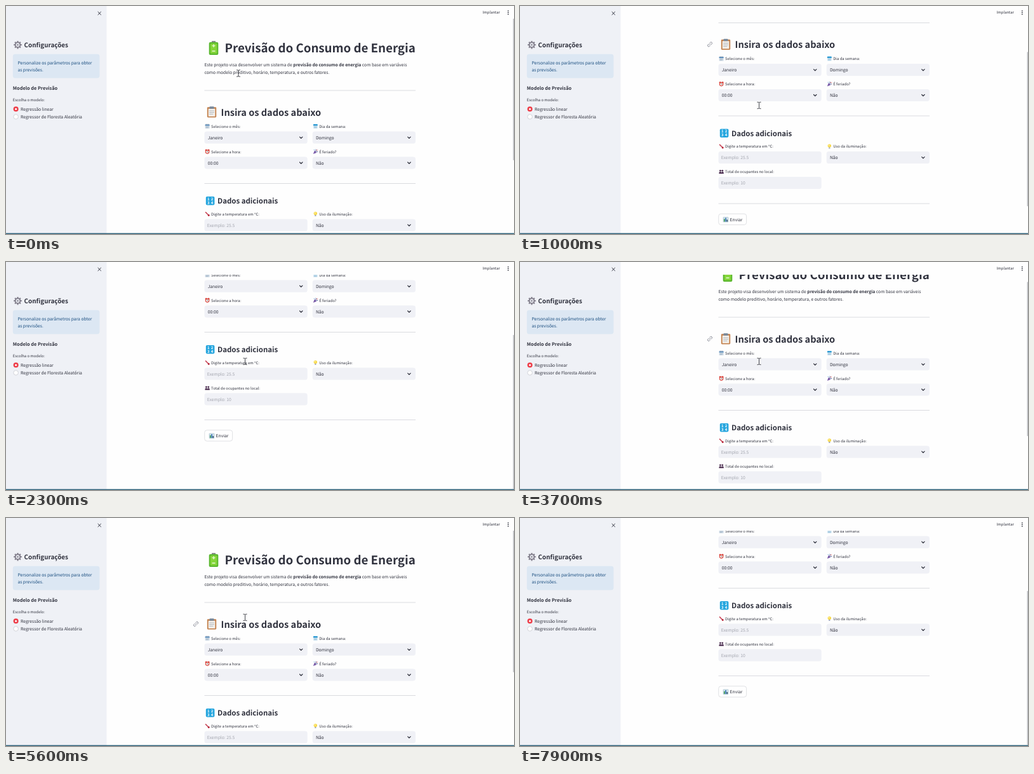
These frames come from a looping animation (800x359 px, 8000 ms). An HTML page:

```html
<!DOCTYPE html>
<html lang="pt-BR">
<head>
<meta charset="utf-8">
<title>Previsão do Consumo de Energia</title>
<style>
  html, body { margin: 0; width: 100%; height: 100%; overflow: hidden; background: #fefefe; }
  svg { display: block; width: 100%; height: 100%; }
  text {
    font-family: "Noto Sans CJK JP", "Noto Sans CJK SC", "Noto Sans CJK", "Lato", sans-serif;
    font-size: 6.76px;
    fill: #31333f;
    text-rendering: geometricPrecision;
  }
  .small { font-size: 5.92px; }
  .bold { font-weight: 700; }
  .hint { fill: #a4a6af; }
  .info { fill: #1c4f80; }
  .deg { font-family: "Noto Sans", sans-serif; }
  .line { fill: none; stroke-linecap: round; stroke-linejoin: round; }
</style>
</head>
<body>
<svg id="stage" viewBox="0 0 800 359" xmlns="http://www.w3.org/2000/svg"></svg>
<script>
const LOOP = 8000, STEP = 100, MAX_SCROLL = 169;
const COL = [312.5, 482.7];

const text = (x, y, str, cls = "", size) =>
  `<text x="${x}" y="${y}" class="${cls}"${size ? ` style="font-size:${size}px"` : ""}>${str}</text>`;
const rect = (x, y, w, h, fill, r = 0, extra = "") =>
  `<rect x="${x}" y="${y}" width="${w}" height="${h}" rx="${r}" fill="${fill}" ${extra}/>`;
const circle = (x, y, r, fill, extra = "") =>
  `<circle cx="${x}" cy="${y}" r="${r}" fill="${fill}" ${extra}/>`;
const line = (d, stroke, w) =>
  `<path class="line" d="${d}" stroke="${stroke}" stroke-width="${w}"/>`;
const at = (x, y, body) => `<g transform="translate(${x} ${y})">${body}</g>`;

// Label icons are drawn around their own centre, about 8 px wide.
const icons = {
  planner: rect(-3.5, -3, 7, 6.6, "#cfdbe6", .6) + rect(-3.5, -3, 7, 2, "#5b8fc0", .6) +
    line("M-2 .6H2M-2 2.2H1", "#8da2b5", .6) + line("M-2-3.6v1M0-3.6v1M2-3.6v1", "#7c8792", .6),
  calendar: rect(-3.4, -3.5, 6.8, 7, "#d8e9f4", .7) + rect(-3.4, -3.5, 6.8, 2.6, "#2f9bd3", .7) +
    line("M-2 .6H2M-2 2.2H2", "#7fb2d0", .7),
  clock: circle(-2, -2.3, 1.5, "#d9433c") + circle(2, -2.3, 1.5, "#d9433c") +
    circle(0, .2, 3.3, "#d9433c") + circle(0, .2, 2.2, "#f7eeea") +
    line("M0-1.2V.3L1 .9", "#4a4146", .6),
  party: `<path d="M-3.5 3.6L-1.4-1.8L1.8 1.6Z" fill="#7a5aa8"/>` +
    line("M.4-.6Q1.6-2 .8-3.4M1.2 .2Q2.4-.6 3.4 0", "#3f4f8f", .9) +
    circle(2.6, -2.4, .8, "#d9524e") + circle(-2, -2.8, .6, "#4b9ad0"),
  heat: line("M-2.6-2.6L1.8 1.8", "#c9495a", 1.6) + circle(2.1, 2.1, 1.5, "#b8293c"),
  bulb: circle(0, -.9, 2.7, "#f7d84a") + circle(-.6, -1.5, 1, "#fff3a8") +
    rect(-1.2, 1.6, 2.4, 2, "#a9adb4", .6),
  people: circle(-1.7, -1.6, 1.4, "#4a2c4f") + circle(1.7, -1.6, 1.4, "#4a2c4f") +
    `<path d="M-3.7 3v-1.2q0-1.7 1.9-1.7T0 1.8q0-1.7 1.8-1.7T3.7 1.8V3Z" fill="#4a2c4f"/>`,
  chart: rect(-4, -3.8, 8, 7.6, "#d5e4ec", .6, 'stroke="#8fb0c0" stroke-width=".5"') +
    rect(-3, -1, 1.7, 4.3, "#3f9b58") + rect(-.8, -2.8, 1.7, 6.1, "#3d79b8") +
    rect(1.4, .2, 1.7, 3.1, "#37546b"),
  battery: rect(-3.2, -11, 6.4, 4, "#87908a", 1) + rect(-7.3, -9, 14.6, 20, "#5bb82f", 2) +
    rect(-5.2, -6.8, 10.4, 15.6, "#86d63b", 1) + line("M-2-3.4H2M0-5.4V-1.4M-2 5H2", "#e9f9d8", 1.4),
  clipboard: rect(-7.2, -7.6, 14.4, 16.2, "#c48350", 1.4) + rect(-5.3, -5, 10.6, 12, "#f4f1ec") +
    line("M-3.5-1.8H3.5M-3.5 .8H3.5M-3.5 3.4H2", "#a9afb8", .9) +
    rect(-3.6, -8.6, 7.2, 3.6, "#78899b", 1.2),
  numbers: rect(-6.8, -6.7, 13.6, 13.4, "#24a5de", 1.8) +
    [["1", -4.6, -.8], ["2", 1.2, -.8], ["3", -4.6, 5.2], ["4", 1.2, 5.2]]
      .map(([n, x, y]) => `<text x="${x}" y="${y}" class="bold" style="font-size:6px;fill:#fff">${n}</text>`).join(""),
  gear: Array.from({ length: 8 }, (_, i) =>
      rect(-1.1, -6.3, 2.2, 3, "#85828f", .5, `transform="rotate(${i * 45})"`)).join("") +
    circle(0, 0, 3.8, "none", 'stroke="#85828f" stroke-width="1.9"') +
    circle(0, 0, 1.3, "#85828f"),
  link: `<g transform="rotate(-45)" fill="none" stroke="#858792" stroke-width=".9">` +
    `<path d="M-.6-1.7H-2.6a1.7 1.7 0 0 0 0 3.4H-.8M.6 1.7H2.6a1.7 1.7 0 0 0 0-3.4H.8M-1.7 0H1.7"/></g>`
};

const rule = y => rect(312.5, y - .45, 332.5, .9, "#d6d7dc");

// One form field: icon, label and grey box; y is the centre of the label.
function field(col, y, icon, label, value, hint) {
  const x = COL[col];
  return at(x + 4.6, y, icons[icon]) +
    text(x + 10.6, y + 2.2, label, "small") +
    rect(x, y + 8, 162.2, 19, "#f0f1f6", 3.6) +
    text(x + (hint ? 4.2 : 5.2), y + 20.1, value, hint ? "hint" : "") +
    (hint ? "" : line(`M${x + 150} ${y + 16.6}l2.2 2.2l2.2-2.2`, "#31333f", 1.25));
}

const page =
  at(327, 66, icons.battery) +
  text(344.6, 73.2, "Previsão do Consumo de Energia", "bold", 18.7) +
  text(312.5, 95, `Este projeto visa desenvolver um sistema de <tspan class="bold">previsão do consumo de energia</tspan> com base em variáveis`) +
  text(312.5, 107, "como modelo preditivo, horário, temperatura, e outros fatores.") +
  rule(133) +
  at(324, 166.8, icons.clipboard) +
  text(338.6, 172.7, "Insira os dados abaixo", "bold", 14.55) +
  field(0, 189.5, "planner", "Selecione o mês:", "Janeiro") +
  field(1, 189.5, "calendar", "Dia da semana:", "Domingo") +
  field(0, 229.4, "clock", "Selecione a hora:", "00:00") +
  field(1, 229.4, "party", "É feriado?", "Não") +
  rule(279.5) +
  at(321.6, 306.7, icons.numbers) +
  text(333, 311.3, "Dados adicionais", "bold", 11.45) +
  field(0, 327.5, "heat", `Digite a temperatura em <tspan class="deg">°</tspan>C:`, "Exemplo: 25.5", true) +
  field(1, 327.5, "bulb", "Uso da iluminação:", "Não") +
  field(0, 367.4, "people", "Total de ocupantes no local:", "Exemplo: 10", true) +
  rule(417.6) +
  rect(312.8, 433.8, 43.8, 17.2, "#fff", 3.6, 'stroke="#d3d4d9" stroke-width=".7"') +
  at(324, 442.8, icons.chart) +
  text(330.6, 445.2, "Enviar") +
  `<g id="linkA">${at(299, 166.9, icons.link)}</g>` +
  `<g id="linkB">${at(299, 306.7, icons.link)}</g>`;

const sidebar =
  rect(0, 0, 158.5, 358, "#eff1f6") +
  line("M144.9 9.2l4.6 4.6m0-4.6l-4.6 4.6", "#31333f", 1) +
  at(18.5, 61.2, icons.gear) +
  text(28.6, 65.1, "Configurações", "bold", 9.9) +
  rect(10.8, 75.8, 136.6, 37.6, "#dce7f3", 3.6) +
  text(18.4, 91.6, "Personalize os parâmetros para obter", "info") +
  text(18.4, 103, "as previsões.", "info") +
  text(10.8, 132.2, "Modelo de Previsão", "bold", 7.35) +
  text(10.8, 150, "Escolha o modelo:", "small") +
  circle(15.6, 162.3, 4, "#ee3f4a") + circle(15.6, 162.3, 1.5, "#fff") +
  text(23, 165.1, "Regressão linear") +
  circle(15.6, 174.4, 3.7, "#fff", 'stroke="#c3c5cc" stroke-width=".7"') +
  text(23, 177.1, "Regressor de Floresta Aleatória");

const header =
  text(750.6, 12.1, "Implantar", "small") +
  [7.5, 10.2, 12.9].map(y => circle(790.8, y, .85, "#31333f")).join("");

const beam = line("M-2.6-5.2Q-.4-5.2 0-4.4Q.4-5.2 2.6-5.2M0-4.4V4.4M-2.6 5.2Q-.4 5.2 0 4.4Q.4 5.2 2.6 5.2", "#33343a", .9);
const arrow = `<path d="M0 0V9.4L2.2 7.4L3.8 11L5.4 10.3L3.8 6.9H6.8Z" fill="#fff" stroke="#222" stroke-width=".8" stroke-linejoin="round"/>`;

const stage = document.getElementById("stage");
stage.innerHTML =
  `<clipPath id="view"><rect x="158.5" y="20" width="641.5" height="338"/></clipPath>` +
  rect(0, 0, 800, 359, "#fefefe") +
  `<g clip-path="url(#view)"><g id="page">${page}</g>` +
  rect(798.6, 0, 1.4, 243, "#bcbec3", .7, 'id="thumb"') + `</g>` +
  sidebar + header +
  rect(0, 357.6, 800, 1.4, "#2c6079") +
  `<g id="beam">${beam}</g><g id="arrow">${arrow}</g>`;

// Tables of [time, value...], linear in between.
const scrollKeys = [[0, 0], [800, 0], [900, 47], [1000, 106.5], [1100, 130], [1200, 141], [1800, 141],
  [1900, 160], [2000, MAX_SCROLL], [3600, MAX_SCROLL], [3700, 46], [3800, 12], [3900, 0],
  [6000, 0], [6100, 30], [6300, 130], [6400, 160], [6500, MAX_SCROLL]];
const pointerKeys = [[0, 366, 106], [200, 366, 106], [600, 376.5, 156.5], [6400, 376.5, 156.5], [6600, 359.3, 79]];
const HIDE_POINTER = 7500, ARROW_FROM = 6500;

function sample(keys, t) {
  const i = keys.findIndex(k => k[0] > t);
  if (i < 0) return keys[keys.length - 1].slice(1);
  const a = keys[i - 1], b = keys[i], p = (t - a[0]) / (b[0] - a[0]);
  return a.slice(1).map((v, j) => v + (b[j + 1] - v) * p);
}

const part = id => document.getElementById(id);
const [pageEl, thumbEl, beamEl, arrowEl, linkA, linkB] =
  ["page", "thumb", "beam", "arrow", "linkA", "linkB"].map(part);
const show = (el, on) => el.setAttribute("visibility", on ? "visible" : "hidden");
const between = (t, a, b) => t >= a && t < b;

function draw(t) {
  const [scroll] = sample(scrollKeys, t);
  const [x, y] = sample(pointerKeys, t);
  pageEl.setAttribute("transform", `translate(0 ${-scroll})`);
  thumbEl.setAttribute("y", scroll * 358 / (358 + MAX_SCROLL));
  beamEl.setAttribute("transform", `translate(${x} ${y})`);
  arrowEl.setAttribute("transform", `translate(${x} ${y})`);
  show(beamEl, t < ARROW_FROM);
  show(arrowEl, between(t, ARROW_FROM, HIDE_POINTER));
  show(linkA, between(t, 600, 1200) || between(t, 3700, 6400));
  show(linkB, between(t, 6400, 6800));
}

const start = performance.now();
function tick() {
  const t = (performance.now() - start) % LOOP;
  draw(Math.floor(t / STEP) * STEP);
  requestAnimationFrame(tick);
}
tick();
</script>
</body>
</html>
```
